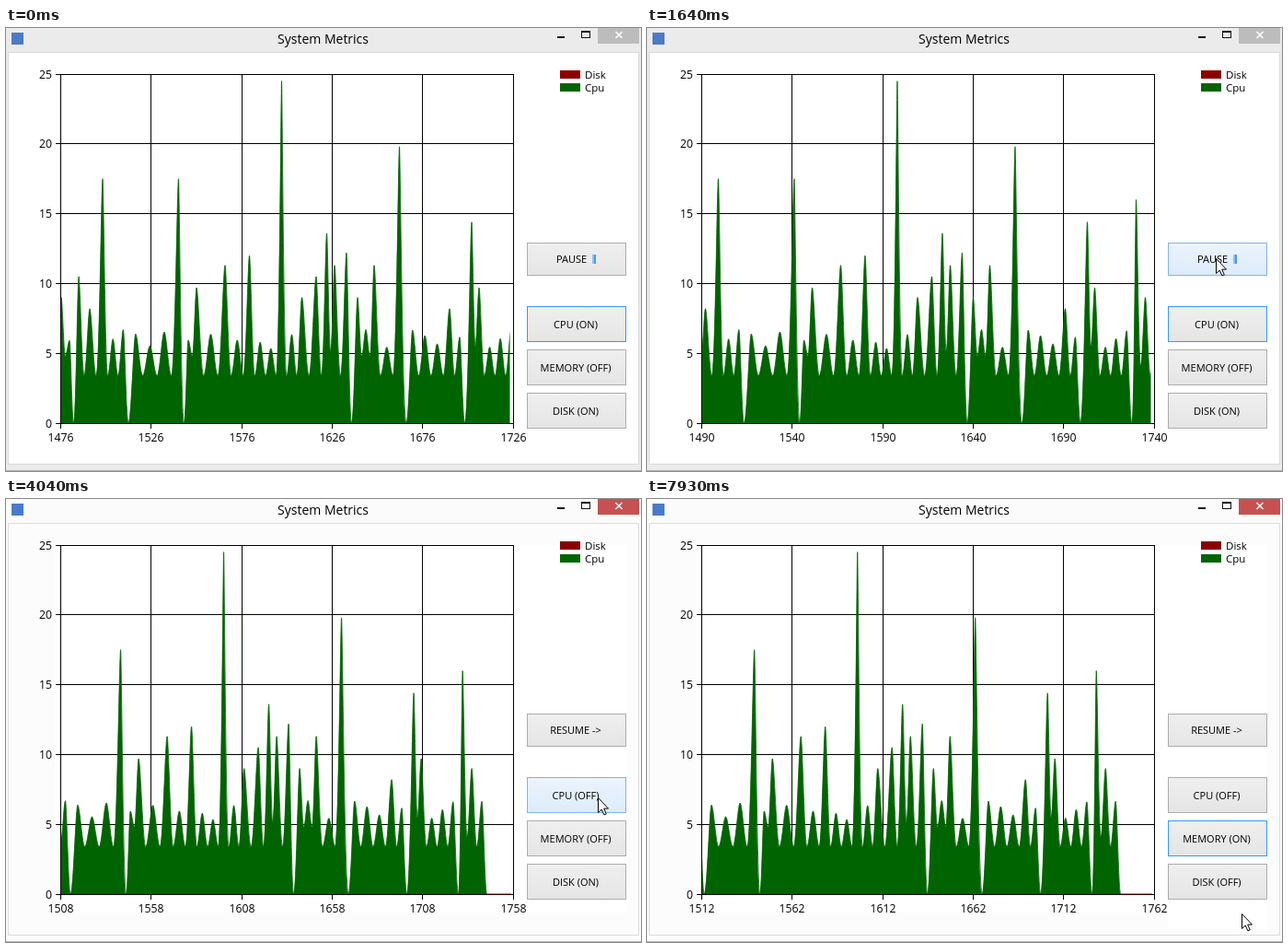
An HTML page with a canvas for the animation above (8 s loop, 690x481 px).

```html
<!DOCTYPE html>
<html lang="en">
<head>
<meta charset="utf-8">
<title>System Metrics</title>
<style>
html, body { margin: 0; width: 100%; height: 100%; overflow: hidden; background: #fff; }
canvas { display: block; }
</style>
</head>
<body>
<canvas id="stage" width="690" height="481"></canvas>
<script>
const ctx = document.getElementById('stage').getContext('2d');
const LOOP = 8000, FONT = '"Open Sans", "Noto Sans", sans-serif';
const LEFT = 59.5, BASE = 429, UNIT_X = 1.966, UNIT_Y = 15.16, FIRST = 1476;
const GREEN = '#006400', RED = '#8b0000';
const CPU_END = 585.5, ACTIVATED = 1760, PAUSED = 2330, CPU_OFF = 3540, DISK_OFF = 4850, MEMORY_ON = 7690;

const clamp = (v, low, high) => Math.min(high, Math.max(low, v));
const ease = p => p * p * (3 - 2 * p);

// Main spikes and idle moments of the load, as [x, percent]
const landmarks = [
  [60, 9], [73.5, 0], [79, 10.5], [91, 8.2], [105, 17.5], [133, 0], [187.5, 17.5], [193.5, 0],
  [207, 9.7], [238, 11.3], [264.5, 12], [299.5, 24.5], [321.5, 9], [337, 10.5], [348.5, 13.6],
  [357, 11.3], [370, 12.2], [375.5, 0], [382, 9], [400, 11.3], [427.5, 19.8], [435, 0],
  [482, 8.2], [498.5, 0], [506, 14.4], [514, 9.7], [554.5, 0], [559, 16], [569, 9], [CPU_END, 0]
];

// Background humps fill the wider gaps, crowding towards idle moments
function humpsBetween([x0, y0], [x1, y1]) {
  const gap = x1 - x0, besideIdle = !y0 || !y1;
  const count = Math.max(0, Math.round((gap - (besideIdle ? 0 : 9)) / 16));
  return Array.from({ length: count }, (_, i) => {
    const part = !y0 ? (i + .5) / (count + .5) : (i + 1) / (count + (y1 ? 1 : .5));
    const x = x0 + gap * part;
    return [x, 6 + .7 * Math.sin(x)];
  });
}

// Neighbouring peaks share a dip, shallower the closer they stand
function dipBetween([x0, y0], [x1, y1]) {
  if (!y0 || !y1) return [];
  return [[(x0 + x1) / 2, 3.4 + .7 * clamp(11 - x1 + x0, 0, 4)]];
}

const fill = (points, between) => points.flatMap((point, i) =>
  i + 1 < points.length ? [point, ...between(point, points[i + 1])] : [point]);
const knots = fill(fill(landmarks, humpsBetween), dipBetween);

// Two units per sample, one once the CPU series is off
function axisStart(t) {
  const fast = Math.min(15, Math.floor((t + 118) / 238));
  const slow = clamp(Math.floor((t - CPU_OFF) / 243), 0, 6);
  return FIRST + 2 * fast + slow;
}

const pointerMoves = [
  { from: 820, to: 1360, x: 618, y: 250 },
  { from: 2420, to: 2840, x: 643, y: 324 },
  { from: 4250, to: 4730, x: 622, y: 424 },
  { from: 6720, to: 7170, x: 640, y: 370 },
  { from: 7720, to: 7930, x: 646, y: 450 }
];

function pointerAt(t) {
  if (t < pointerMoves[0].from) return null;
  let x = 688, y = 300;
  for (const move of pointerMoves) {
    const p = ease(clamp((t - move.from) / (move.to - move.from), 0, 1));
    x += (move.x - x) * p;
    y += (move.y - y) * p;
  }
  return { x: Math.round(x), y: Math.round(y) };
}

function rect(color, x, y, w, h) {
  ctx.fillStyle = color;
  ctx.fillRect(x, y, w, h);
}

function frame(color, x, y, w, h) {
  ctx.strokeStyle = color;
  ctx.lineWidth = 1;
  ctx.strokeRect(x + .5, y + .5, w - 1, h - 1);
}

function text(string, x, y, size, align = 'center') {
  ctx.font = `${size}px ${FONT}`;
  ctx.textAlign = align;
  ctx.fillStyle = '#000';
  ctx.fillText(string, x, y);
}

function drawWindow(active) {
  rect(active ? '#fbfbfb' : '#ebebeb', 0, 0, 690, 481);
  rect(active ? '#fcfcfc' : '#fff', 2, 26, 686, 448);
  frame(active ? '#dcdcdc' : '#d9d9d9', 2, 26, 686, 448);
  rect('#fff', 53, 50, 621, 399);
  rect('#b4b4b4', 0, 480, 690, 1);
  rect('#4a7ac8', 6, 5, 13, 13);
  text('System Metrics', 344.5, 17, 14);
  rect('#111', 599, 9, 8, 2);
  frame('#111', 625, 3, 10, 8);
  rect('#111', 625, 3, 10, 2);
  rect(active ? '#c75050' : '#bcbcbc', 643, 0, 45, 17);
  ctx.strokeStyle = '#fff';
  ctx.lineWidth = 1.6;
  ctx.beginPath();
  ctx.moveTo(662.5, 4); ctx.lineTo(669.5, 11);
  ctx.moveTo(669.5, 4); ctx.lineTo(662.5, 11);
  ctx.stroke();
}

function drawLegend() {
  [['Disk', RED], ['Cpu', GREEN]].forEach(([label, color], i) => {
    const y = 46 + 14 * i;
    rect(color, 602, y, 22, 9);
    text(label, 629, y + 9, 11.5, 'left');
  });
}

function drawGrid(start) {
  for (let i = 0; i <= 5; i++) {
    const x = Math.floor(LEFT + 98.3 * i), y = Math.floor(50 + 75.8 * i);
    rect('#000', x, 50, 1, 385);
    rect('#000', 54, y, 498, 1);
    text(start + 50 * i, x + .5, 449, 12.25);
    text(25 - 5 * i, 50, y + 4.5, 12.25, 'right');
  }
}

// Every knot is level; the higher the rise, the sharper its top and the wider its foot
function traceCpu() {
  const toY = value => BASE - value * UNIT_Y;
  ctx.beginPath();
  ctx.moveTo(knots[0][0], BASE);
  ctx.lineTo(knots[0][0], toY(knots[0][1]));
  for (let i = 1; i < knots.length; i++) {
    const [x0, y0] = knots[i - 1], [x1, y1] = knots[i];
    const gap = x1 - x0, rise = Math.abs(y1 - y0);
    const top = gap * (.33 - .01 * rise), foot = gap * (.33 + .012 * rise);
    const [out, into] = y1 > y0 ? [foot, top] : [top, foot];
    ctx.bezierCurveTo(x0 + out, toY(y0), x1 - into, toY(y1), x1, toY(y1));
  }
  ctx.closePath();
}

function drawSeries(start) {
  const shift = (start - FIRST) * UNIT_X;
  ctx.save();
  ctx.beginPath();
  ctx.rect(60, 50, 487.5, BASE - 50);
  ctx.clip();
  ctx.translate(-shift, 0);
  rect(RED, 392.5, BASE - 3.75 * UNIT_Y, 3, 30);
  traceCpu();
  ctx.fillStyle = ctx.strokeStyle = GREEN;
  ctx.lineWidth = .8;
  ctx.fill();
  ctx.stroke();
  ctx.restore();
  const tail = CPU_END - shift;
  if (tail < 549) rect(RED, tail, BASE - .5, 549 - tail, 1);
}

function drawButton({ label, y, h, focused }, pointer) {
  const x = 566, w = 108;
  const hover = pointer && pointer.x >= x && pointer.x < x + w && pointer.y >= y && pointer.y < y + h;
  const shade = ctx.createLinearGradient(0, y, 0, y + h);
  shade.addColorStop(0, hover ? '#ecf4fc' : '#efefef');
  shade.addColorStop(1, hover ? '#dcebfb' : '#e5e5e5');
  rect(shade, x, y, w, h);
  frame(hover ? '#7eb4ea' : focused ? '#3399ff' : '#acacac', x, y, w, h);
  const baseline = y + h / 2 + 4;
  if (label === 'PAUSE') {
    text(label, 598, baseline, 11, 'left');
    rect('#8fc3f5', 637, y + 13, 4, 10);
    rect('#4a97e0', 639, y + 13, 2, 10);
  } else {
    text(label, 619, baseline, 11);
  }
}

function drawPointer({ x, y }) {
  ctx.save();
  ctx.translate(x + .5, y + .5);
  ctx.fillStyle = '#fff';
  ctx.strokeStyle = '#000';
  ctx.lineWidth = 1;
  const arrow = new Path2D('M0 0V16L3.7 12.6 6.4 18.4 8.8 17.4 6.2 11.6H11Z');
  ctx.fill(arrow);
  ctx.stroke(arrow);
  ctx.restore();
}

function buttonsAt(t) {
  const state = on => on ? '(ON)' : '(OFF)';
  const within = (from, to) => t >= from && t < to;
  return [
    { label: t < PAUSED ? 'PAUSE' : 'RESUME ->', y: 233, h: 36, focused: within(ACTIVATED, CPU_OFF) },
    { label: `CPU ${state(t < CPU_OFF)}`, y: 302, h: 39, focused: t < ACTIVATED || within(CPU_OFF, DISK_OFF) },
    { label: `MEMORY ${state(t >= MEMORY_ON)}`, y: 349, h: 39, focused: t >= MEMORY_ON },
    { label: `DISK ${state(t < DISK_OFF)}`, y: 396, h: 39, focused: within(DISK_OFF, MEMORY_ON) }
  ];
}

function render() {
  const t = performance.now() % LOOP;
  const start = axisStart(t), pointer = pointerAt(t);
  drawWindow(t >= ACTIVATED);
  if (t >= MEMORY_ON) rect('#fff', 566, 435, 108, 34);
  drawLegend();
  drawGrid(start);
  drawSeries(start);
  buttonsAt(t).forEach(button => drawButton(button, pointer));
  if (pointer) drawPointer(pointer);
  requestAnimationFrame(render);
}
render();
</script>
</body>
</html>
```
